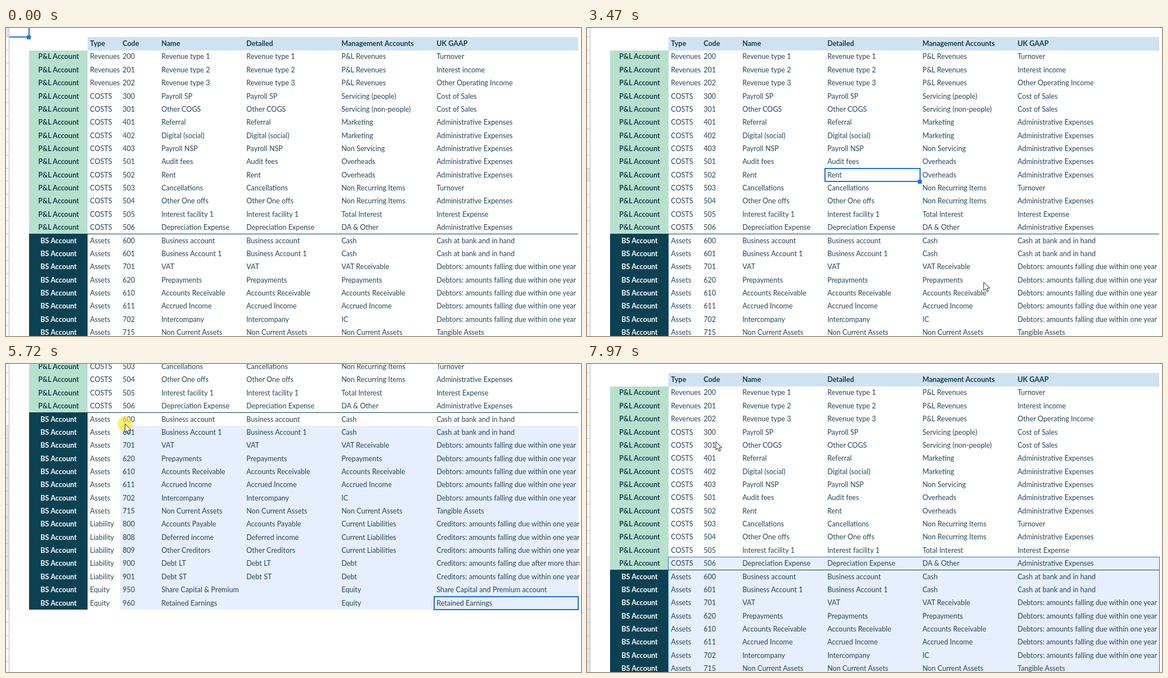
An HTML page that plays this animation: 1022 by 548 pixels, repeating every 8000 ms.

```html
<!DOCTYPE html>
<html lang="en">
<head>
<meta charset="utf-8">
<title>Chart of accounts</title>
<style>
  html, body { margin: 0; width: 100%; height: 100%; overflow: hidden; background: #fff; }
  svg { display: block; width: 1022px; height: 548px; }
  text { font: 12.6px Lato, "Open Sans", sans-serif; word-spacing: .1px; fill: #27475a; }
  .bold { font-weight: 700; fill: #173f52; }
  .label { text-anchor: middle; }
  .light { fill: #fff; }
</style>
</head>
<body>
<svg id="stage" viewBox="0 0 1022 548">
  <defs><clipPath id="edge"><rect width="1019" height="548"/></clipPath></defs>
  <g clip-path="url(#edge)">
    <g id="sheet">
      <g id="fills"></g>
      <rect id="range" fill="#0e65eb" fill-opacity=".1"/>
      <g id="cells"></g>
      <rect id="outline" fill="none" stroke="#1a73e8"/>
      <rect id="active" fill="none" stroke="#1a6fdc" stroke-width="2"/>
      <rect id="handle" width="7" height="7" fill="#1a73e8"/>
    </g>
    <rect width="5" height="548" fill="#f8f9fa"/>
    <rect id="shade" width="5" fill="#e1e4e8"/>
    <g id="ticks"></g>
    <path d="M5.5 0V548" stroke="#bcbec0"/>
  </g>
  <circle id="press" r="13.5" fill="#fae628" fill-opacity=".65"/>
  <path id="cursor" d="M0 0V15L3.5 11.8 6 17.2 8.4 16.1 6 11H10.8Z" fill="#fff" stroke="#222" stroke-width="1"/>
</svg>
<script>
const LOOP = 8000, TOP = 16.4, ROW = 23.36, LAST = 29, SPLIT = 15;
const cols = [5, 41, 145, 203, 272, 423, 592, 761, 1017];
const $ = id => document.getElementById(id);
const rowY = r => Math.round(TOP + r * ROW);

// type | code | name | management | statutory | detailed (defaults to name)
const debtors = 'Debtors: amounts falling due within one year';
const creditors = 'Creditors: amounts falling due within one year';
const admin = 'Administrative Expenses';
const table = `Type|Code|Name|Management Accounts|UK GAAP|Detailed
Revenues|200|Revenue type 1|P&L Revenues|Turnover
Revenues|201|Revenue type 2|P&L Revenues|Interest income
Revenues|202|Revenue type 3|P&L Revenues|Other Operating Income
COSTS|300|Payroll SP|Servicing (people)|Cost of Sales
COSTS|301|Other COGS|Servicing (non-people)|Cost of Sales
COSTS|401|Referral|Marketing|${admin}
COSTS|402|Digital (social)|Marketing|${admin}
COSTS|403|Payroll NSP|Non Servicing|${admin}
COSTS|501|Audit fees|Overheads|${admin}
COSTS|502|Rent|Overheads|${admin}
COSTS|503|Cancellations|Non Recurring Items|Turnover
COSTS|504|Other One offs|Non Recurring Items|${admin}
COSTS|505|Interest facility 1|Total Interest|Interest Expense
COSTS|506|Depreciation Expense|DA & Other|${admin}
Assets|600|Business account|Cash|Cash at bank and in hand
Assets|601|Business Account 1|Cash|Cash at bank and in hand
Assets|701|VAT|VAT Receivable|${debtors}
Assets|620|Prepayments|Prepayments|${debtors}
Assets|610|Accounts Receivable|Accounts Receivable|${debtors}
Assets|611|Accrued Income|Accrued Income|${debtors}
Assets|702|Intercompany|IC|${debtors}
Assets|715|Non Current Assets|Non Current Assets|Tangible Assets
Liability|800|Accounts Payable|Current Liabilities|${creditors}
Liability|808|Deferred income|Current Liabilities|${creditors}
Liability|809|Other Creditors|Current Liabilities|${creditors}
Liability|900|Debt LT|Debt|Creditors: amounts falling due after more than one year
Liability|901|Debt ST|Debt|${creditors}
Equity|950|Share Capital & Premium|Equity|Share Capital and Premium account|
Equity|960|Retained Earnings|Equity|Retained Earnings|`;

function add(parent, tag, attrs, content = '') {
  const el = document.createElementNS('http://www.w3.org/2000/svg', tag);
  for (const k in attrs) el.setAttribute(k, attrs[k]);
  el.textContent = content;
  return parent.appendChild(el);
}

function box(el, x, y, x2, y2) {
  const size = { x, y, width: x2 - x, height: y2 - y };
  for (const k in size) el.setAttribute(k, size[k]);
}

const show = (el, on) => el.setAttribute('visibility', on ? 'visible' : 'hidden');

function build() {
  const fill = (x, r, x2, r2, color) =>
    box(add($('fills'), 'rect', { fill: color }), x, rowY(r), x2, rowY(r2));
  fill(145, 0, 1017, 1, '#cfe2f3');
  fill(41, 1, 145, SPLIT, '#b7e1cd');
  fill(41, SPLIT, 145, LAST + 1, '#0c4153');
  add($('fills'), 'path', { d: `M41 ${rowY(SPLIT) - .5}H1017`, stroke: '#0c4153' });

  table.split('\n').forEach((line, r) => {
    const [type, code, name, management, statutory, detailed = name] = line.split('|');
    const y = TOP + r * ROW + 15.7;
    [type, code, name, detailed, management, statutory].forEach((s, i) =>
      add($('cells'), 'text', { x: cols[i + 2] + 4.2, y, class: r ? '' : 'bold' }, s));
    if (r) {
      const pl = r < SPLIT;
      add($('cells'), 'text', { x: 93.5, y, class: 'bold label' + (pl ? '' : ' light') },
        pl ? 'P&L Account' : 'BS Account');
    }
  });
  for (let r = 0; r < 23; r++)
    add($('ticks'), 'path', { d: `M0 ${rowY(r) - .5}H5`, stroke: '#c6c8ca' });
}

// time, x, y of the pointer
const path = [
  [520, 506, 465], [1280, 144, 197], [1490, 121, 170], [1750, 121, 170],
  [2590, 88, 28], [3050, 555, 262], [3400, 691, 432], [3470, 705, 452], [3550, 705, 452],
  [4020, 560, 268], [4290, 560, 265], [4420, 591, 156], [4550, 591, 156],
  [4900, 700, 463], [5200, 850, 428], [5260, 800, 420], [5370, 640, 298],
  [5500, 400, 190], [5600, 235, 122], [5720, 212, 107], [5830, 165, 76], [5900, 165, 76],
  [6210, 165, 120], [6910, 847, 403], [7700, 847, 403], [7970, 229, 138]
];

function pointer(t) {
  const i = path.findIndex(p => p[0] > t);
  if (i < 1) return path[i < 0 ? path.length - 1 : 0].slice(1);
  const [t0, x0, y0] = path[i - 1], [t1, x1, y1] = path[i];
  const k = (t - t0) / (t1 - t0);
  return [x0 + (x1 - x0) * k, y0 + (y1 - y0) * k];
}

// the wheel jumps four rows at a time
const jumps = [[3690, 4], [3960, 8], [4290, 12], [5970, 8], [6110, 4], [6350, 0]];
const scrollAt = t => jumps.reduce((s, [at, rows]) => t >= at ? rows : s, 0);

function selection(t) {
  if (t < 3080) return { c: 0, r: -1, c0: 0, r0: -1 };
  if (t < 5210) return { c: 5, r: 10, c0: 5, r0: 10 };
  // the dragged range trails the pointer
  const [x, y] = pointer(Math.min(t, 6020) - 120);
  const c0 = cols.findIndex(edge => edge > x) - 1;
  const r0 = Math.min(LAST, Math.floor((y - TOP) / ROW) + 12);
  return { c: 7, r: LAST, c0, r0 };
}

function draw(t) {
  const shift = -Math.round(scrollAt(t) * ROW);
  $('sheet').setAttribute('transform', `translate(0 ${shift})`);

  const { c, r, c0, r0 } = selection(t);
  const left = cols[c], right = cols[c + 1], bottom = rowY(r + 1);
  const many = c0 !== c || r0 !== r;
  box($('active'), left, rowY(r), right, bottom);
  box($('range'), cols[c0], rowY(r0), right, bottom);
  box($('outline'), cols[c0] - .5, rowY(r0) + .5, right + .5, bottom + .5);
  box($('shade'), 0, rowY(r0) + shift, 5, bottom + shift);
  $('handle').setAttribute('x', right - 4);
  $('handle').setAttribute('y', bottom - 3);
  show($('range'), many);
  show($('outline'), many && t > 5900);
  show($('handle'), t < 5210);

  const [x, y] = pointer(t);
  for (const id of ['cursor', 'press'])
    $(id).setAttribute('transform', `translate(${x} ${y})`);
  show($('cursor'), t >= 520);
  show($('press'), t >= 3010 && t < 3120 || t >= 5190 && t < 5900);
}

build();
const start = performance.now();
(function tick() {
  draw((performance.now() - start) % LOOP);
  requestAnimationFrame(tick);
})();
</script>
</body>
</html>
```
